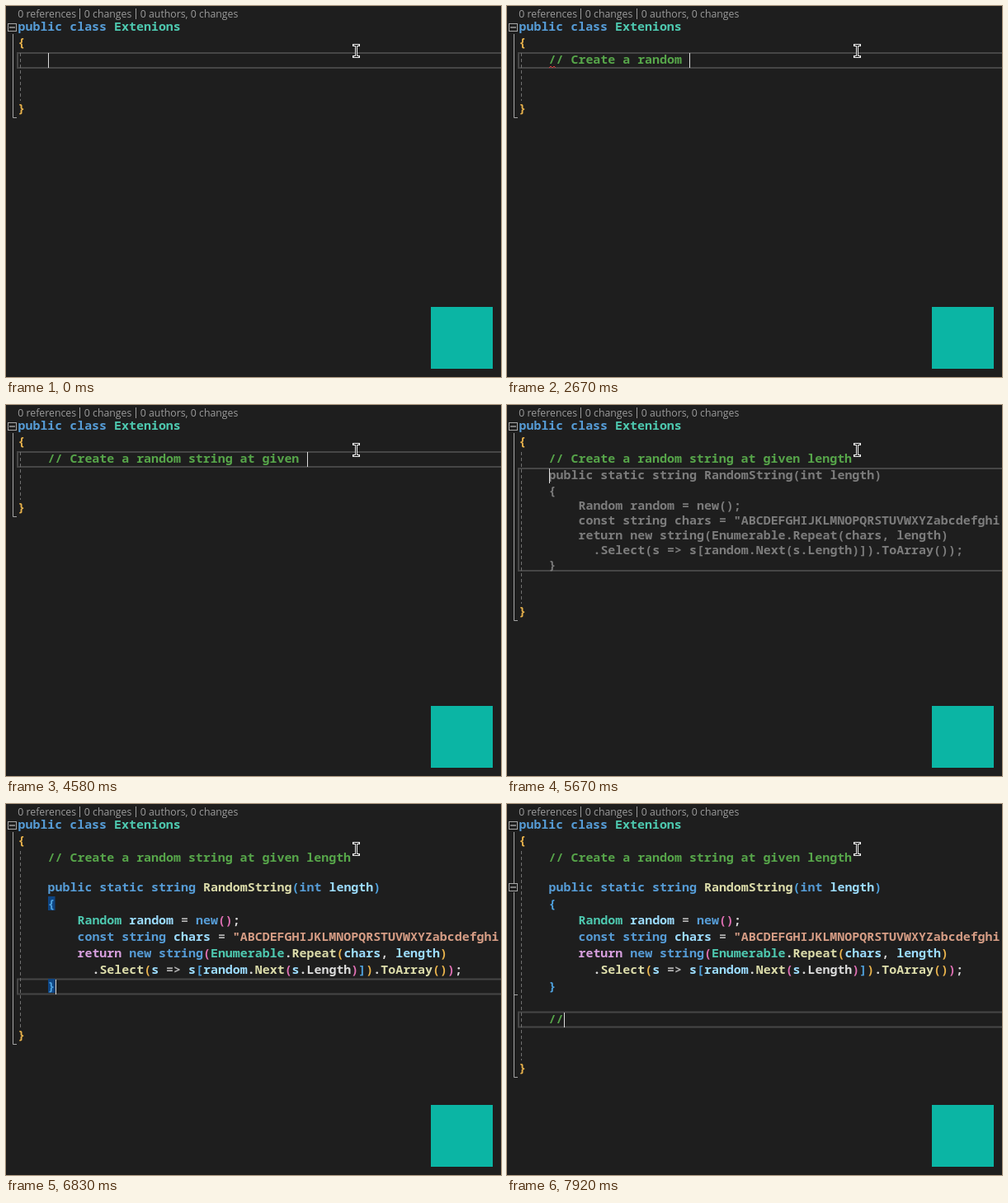
Write an HTML page with a canvas that moves like this. It is 600 px wide and 450 px high and loops after 8000 ms.

```html
<!DOCTYPE html>
<html lang="en">
<head>
<meta charset="utf-8">
<title>Code completion</title>
<style>
  html, body { margin: 0; width: 100%; height: 100%; overflow: hidden; background: #1e1e1e; }
  canvas { display: block; }
</style>
</head>
<body>
<canvas id="stage" width="600" height="450"></canvas>
<script>
const ctx = document.getElementById('stage').getContext('2d');
const LOOP = 8000, LEFT = 50.6, ADVANCE = 8.97, LINE = 20;
const CODE_FONT = '600 14.95px "Noto Sans Mono", monospace';
const LENS_FONT = '12.3px "Open Sans", sans-serif';
const COMMENT = '// Create a random string at given length';

const COLORS = {
  key: '#569cd6', type: '#4ec9b0', method: '#dcdcaa', local: '#9cdcfe', plain: '#dcdcdc',
  flow: '#d8a0df', text: '#d69d85', note: '#57a64a', ghost: '#7c7c7c',
  gold: '#e8b24c', blue: '#4fa3e0', pink: '#e070b4', dim: '#b4b4b4'
};

// Each line: indent column, then alternating colour and text.
const METHOD = [
  [0, 'key', 'public static string ', 'method', 'RandomString', 'blue', '(', 'key', 'int ', 'local', 'length', 'blue', ')'],
  [0, 'blue', '{'],
  [4, 'type', 'Random ', 'local', 'random ', 'dim', '= ', 'key', 'new', 'pink', '()', 'plain', ';'],
  [4, 'key', 'const string ', 'local', 'chars ', 'dim', '= ', 'text', '"ABCDEFGHIJKLMNOPQRSTUVWXYZabcdefghi'],
  [4, 'flow', 'return ', 'key', 'new string', 'pink', '(', 'type', 'Enumerable', 'plain', '.', 'method', 'Repeat',
    'gold', '(', 'local', 'chars', 'plain', ', ', 'local', 'length', 'gold', ')'],
  [6, 'plain', '.', 'method', 'Select', 'gold', '(', 'local', 's ', 'dim', '=> ', 'local', 's', 'blue', '[',
    'local', 'random', 'plain', '.', 'method', 'Next', 'pink', '(', 'local', 's', 'plain', '.Length', 'pink', ')',
    'blue', ']', 'gold', ')', 'plain', '.', 'method', 'ToArray', 'gold', '()', 'pink', ')', 'plain', ';'],
  [0, 'blue', '}']
];

// Typing pace: [time, characters]
const TYPING = [[290, 0], [1020, 6], [2610, 19], [4520, 35], [5230, 41]];
const AT = { squiggle: 560, squiggleEnd: 3400, enter: 5330, ghost: 5420, accept: 6080,
  enters: [7080, 7250], slashes: [7570, 7740], fold: 7580 };

const countPassed = (times, t) => times.filter(time => t >= time).length;

function typedCount(t) {
  if (t < TYPING[0][0]) return 0;
  for (let i = 1; i < TYPING.length; i++) {
    const [t0, n0] = TYPING[i - 1], [t1, n1] = TYPING[i];
    if (t < t1) return Math.floor(n0 + (n1 - n0) * (t - t0) / (t1 - t0));
  }
  return COMMENT.length;
}

function rect(color, x, y, w, h) {
  ctx.fillStyle = color;
  ctx.fillRect(x, y, w, h);
}

function text(str, x, y, color) {
  ctx.fillStyle = COLORS[color];
  ctx.fillText(str, x, y + 5);
}

function codeLine([indent, ...parts], y, override) {
  let col = indent;
  for (let i = 0; i < parts.length; i += 2) {
    text(parts[i + 1], LEFT + col * ADVANCE, y, override || parts[i]);
    col += parts[i + 1].length;
  }
}

function stroke(color, width, points, dash = []) {
  ctx.strokeStyle = color;
  ctx.lineWidth = width;
  ctx.setLineDash(dash);
  ctx.beginPath();
  points.forEach(([x, y]) => ctx.lineTo(x, y));
  ctx.stroke();
  ctx.setLineDash([]);
}

function foldBox(y) {
  rect('#1e1e1e', 2, y - 5, 12, 11);
  ctx.strokeStyle = '#a5a5a5';
  ctx.lineWidth = 1;
  ctx.strokeRect(2.5, y - 4.5, 10, 9);
  rect('#dcdcdc', 4, y - 0.5, 7, 1);
}

function codeLens() {
  ctx.font = LENS_FONT;
  ctx.fillStyle = '#9b9b9b';
  ctx.fillText('0 references', 14.3, 14);
  ctx.fillText('0 changes', 94.8, 14);
  ctx.fillText('0 authors, 0 changes', 162.8, 14);
  rect('#9b9b9b', 89, 3, 1, 13);
  rect('#9b9b9b', 157, 3, 1, 13);
}

function pointer() {
  const beam = [[[421.5, 47.5], [427.5, 47.5]], [[424.5, 47.5], [424.5, 61.5]], [[421.5, 61.5], [427.5, 61.5]]];
  ctx.lineCap = 'square';
  beam.forEach(part => stroke('#f2f2f2', 3, part));
  ctx.lineCap = 'butt';
  beam.forEach(part => stroke('#111', 1, part));
}

function draw(t) {
  const entered = t >= AT.enter, accepted = t >= AT.accept;
  const ghost = t >= AT.ghost && !accepted;
  const enters = countPassed(AT.enters, t);
  const slashes = countPassed(AT.slashes, t);
  const typed = typedCount(t);
  const closeY = accepted ? 281 + enters * LINE : ghost ? 251 : entered ? 145 : 125;
  const lineY = accepted ? 221 + enters * LINE : entered ? 85.5 : 65.5;
  const lineEnd = ghost ? 201 : lineY + 9.5;
  const caretCol = accepted ? (enters ? slashes : 1) : entered ? 0 : typed;

  rect('#1e1e1e', 0, 0, 600, 450);
  codeLens();

  stroke('#464646', 2, [[602, lineY - 8.5], [14, lineY - 8.5], [14, lineEnd], [602, lineEnd]]);
  stroke('#707070', 1, [[17.5, 57], [17.5, closeY - 10]], [4, 3]);
  stroke('#a5a5a5', 1, [[8.5, 34], [8.5, closeY + 10.5], [13, closeY + 10.5]]);
  foldBox(26);
  if (t >= AT.fold) {
    foldBox(101);
    rect('#a5a5a5', 8, 231, 5, 1);
  }

  ctx.font = CODE_FONT;
  text('public class ', 14.5, 25, 'key');
  text('Extenions', 14.5 + 13 * ADVANCE, 25, 'type');
  text('{', 14.2, 44, 'gold');
  text('}', 14.2, closeY - 1, 'gold');
  text(COMMENT.slice(0, typed), LEFT, 65, 'note');

  if (t >= AT.squiggle && t < AT.squiggleEnd)
    stroke('#d83a3a', 1, [[51, 75], [53, 73], [55, 75], [57, 73], [59, 75]]);

  if (ghost) METHOD.forEach((line, i) => codeLine(line, 85 + Math.ceil(i * 18.1), 'ghost'));
  if (accepted) {
    if (!enters) [121, 221].forEach(y => rect('#0e4583', 51, y - 9, 8.5, 17));
    METHOD.forEach((line, i) => codeLine(line, 101 + i * LINE));
    text('//'.slice(0, slashes), LEFT, lineY, 'note');
  }

  rect('#dcdcdc', Math.round(LEFT + caretCol * ADVANCE), Math.floor(lineY - 8), 1, 18);
  pointer();
  rect('#0bb5a4', 515, 365, 75, 75);
}

let start;
function tick(now) {
  start ??= now;
  draw((now - start) % LOOP);
  requestAnimationFrame(tick);
}
draw(0);
requestAnimationFrame(tick);
</script>
</body>
</html>
```
